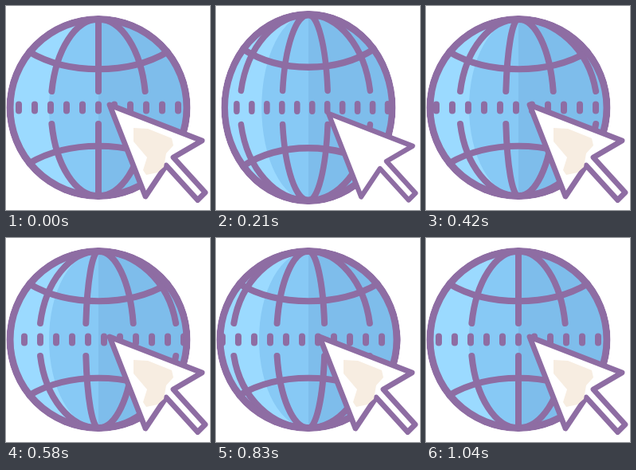
Animation of 256 by 256 pixels, one loop 1180 ms. Source, as an HTML page with a canvas:

```html
<!DOCTYPE html>
<html lang="en">
<head>
<meta charset="utf-8">
<title>Spinning globe with cursor</title>
<style>
  html, body { margin: 0; width: 100%; height: 100%; overflow: hidden; background: #fff; }
  canvas { display: block; width: 256px; height: 256px; }
</style>
</head>
<body>
<canvas id="stage" width="256" height="256"></canvas>
<script>
const ctx = document.getElementById('stage').getContext('2d');
const LOOP = 1180, LAST = 25;
const CX = 116, CY = 127.5, R = 111, RIM = 9;
const LINE = '#8e6da3';

// Keys: [step at 24 per second, distance travelled in pixels]
const meridianKeys = [[2, 0], [5, 26], [10, 106], [14, 167], [17, 212], [20, 264.5], [25, 305]];
const dotKeys = [[2, 0], [5, 25], [10, 97], [14, 167], [17, 220], [20, 272], [25, 300]];

const stepStart = n => Math.round(n * 25 / 6) * 10;

function stepAt(t) {
  let n = 0;
  while (n < LAST && stepStart(n + 1) <= t) n++;
  return n;
}

// Smooth curve through the keys, at rest at both ends
function travel(keys, n) {
  const end = keys.length - 1;
  if (n <= keys[0][0]) return keys[0][1];
  if (n >= keys[end][0]) return keys[end][1];
  const slope = i => i === 0 || i === end ? 0
    : (keys[i + 1][1] - keys[i - 1][1]) / (keys[i + 1][0] - keys[i - 1][0]);
  const i = keys.findIndex(k => k[0] > n) - 1;
  const [n0, a] = keys[i], [n1, b] = keys[i + 1];
  const w = n1 - n0, u = (n - n0) / w, v = 1 - u;
  return a * v * v * (1 + 2 * u) + b * u * u * (1 + 2 * v)
    + w * u * v * (v * slope(i) - u * slope(i + 1));
}

function pulse(n, from, peak, to) {
  if (n <= from || n >= to) return 0;
  const u = n < peak ? (n - from) / (peak - from) : (to - n) / (to - peak);
  return (1 - Math.cos(Math.PI * u)) / 2;
}

function fillCircle(r, color) {
  ctx.beginPath();
  ctx.arc(0, 0, r, 0, 7);
  ctx.fillStyle = color;
  ctx.fill();
}

function meridian(s) {
  const x = s * (1 - 6e-6 * s * s); // lines crowd slightly toward the rim
  const gap = Math.asin(20.5 / R), rx = Math.abs(x);
  for (const side of [-1, 1]) {
    const a = side * gap, b = side * Math.PI / 2;
    ctx.beginPath();
    if (x >= 0) ctx.ellipse(0, 0, rx, R, 0, a, b, side < 0);
    else ctx.ellipse(0, 0, rx, R, 0, Math.PI - a, Math.PI - b, side > 0);
    ctx.stroke();
  }
}

function repeat(spacing, shift, limit, draw) {
  const first = shift % spacing - spacing * Math.ceil(limit / spacing);
  for (let x = first; x <= limit; x += spacing) if (x >= -limit) draw(x);
}

function globe(n, squash) {
  ctx.save();
  ctx.translate(CX, CY);
  ctx.scale(1 - 0.052 * squash, 1 + 0.052 * squash);
  ctx.beginPath();
  ctx.arc(0, 0, R + RIM / 2, 0, 7);
  ctx.clip();

  fillCircle(R, '#9bdaff');
  ctx.beginPath();
  ctx.ellipse(0, 0, 62, R, 0, Math.PI / 2, Math.PI * 1.5);
  ctx.arc(0, 0, R, -Math.PI / 2, Math.PI / 2);
  ctx.fillStyle = '#87c9f5';
  ctx.fill();
  ctx.beginPath();
  ctx.arc(0, 0, R, -Math.PI / 2, Math.PI / 2);
  ctx.fillStyle = '#7ebdeb';
  ctx.fill();

  ctx.strokeStyle = LINE;
  ctx.lineWidth = 8;
  ctx.lineCap = 'round';
  for (const side of [-1, 1]) {
    ctx.beginPath();
    ctx.moveTo(-87, side * 70);
    ctx.bezierCurveTo(-38, side * 41, 38, side * 41, 87, side * 70);
    ctx.stroke();
  }
  repeat(61, travel(meridianKeys, n), 110, meridian);

  repeat(20, travel(dotKeys, n), 112, x => {
    ctx.beginPath();
    ctx.moveTo(x, -4);
    ctx.lineTo(x, 4);
    ctx.stroke();
  });

  ctx.lineWidth = RIM;
  ctx.beginPath();
  ctx.arc(0, 0, R, 0, 7);
  ctx.stroke();
  ctx.restore();
}

function polygon(points) {
  ctx.beginPath();
  for (const [x, y] of points) ctx.lineTo(x, y);
  ctx.closePath();
}

function cursor(press) {
  ctx.save();
  ctx.translate(254, 244);
  ctx.scale(1 - 0.09 * press, 1 - 0.09 * press);
  ctx.translate(-254, -244);
  ctx.lineJoin = 'round';
  ctx.lineWidth = 6.8;
  ctx.strokeStyle = LINE;
  polygon([[130, 124], [246, 169], [210, 190], [250, 234], [240.5, 243.5], [201, 200], [175, 239]]);
  ctx.fillStyle = '#fff';
  ctx.fill();
  ctx.stroke();
  if (press < 0.1) {
    polygon([[160, 153], [178, 154], [208, 166], [210, 175], [201, 185], [198, 202], [190, 209], [176, 212], [172, 206], [177, 190], [160, 170]]);
    ctx.fillStyle = '#f7ede1';
    ctx.fill();
  }
  ctx.restore();
}

function draw(now) {
  const n = stepAt(now % LOOP);
  const press = pulse(n, 2, 5, 8) + pulse(n, 20, 23, 25);
  ctx.fillStyle = '#fff';
  ctx.fillRect(0, 0, 256, 256);
  globe(n, press);
  cursor(press);
}

const start = performance.now();
function tick() {
  draw(performance.now() - start);
  requestAnimationFrame(tick);
}
tick();
</script>
</body>
</html>
```
